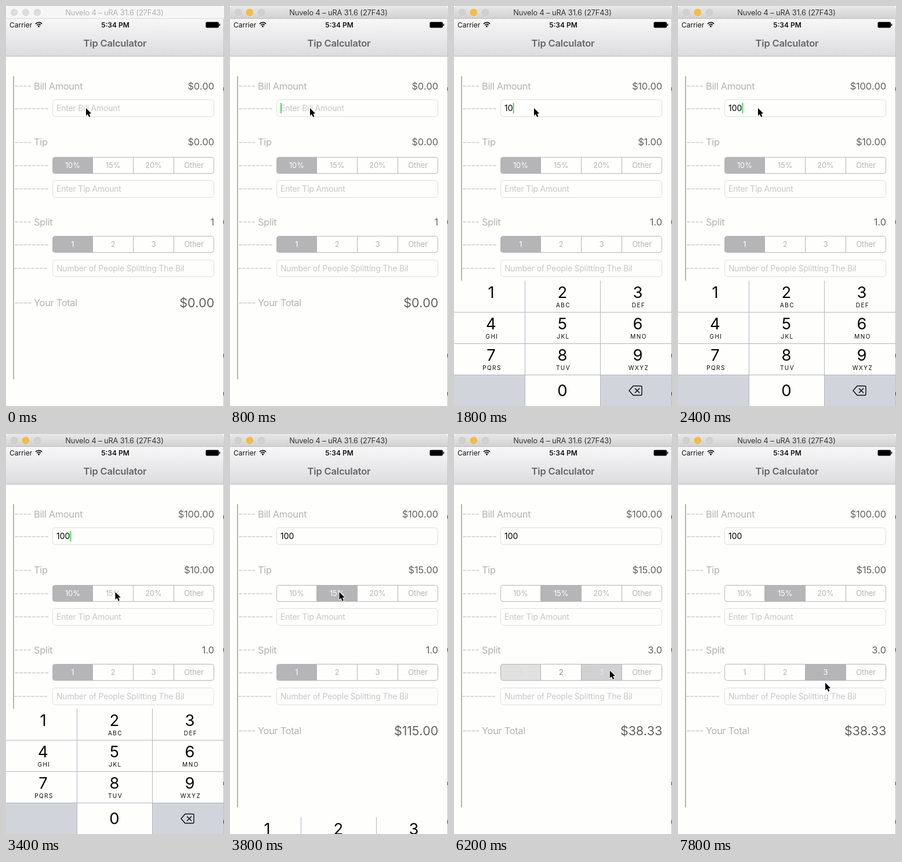
These frames come from a looping animation (376 by 689 pixels, 8000 ms). An HTML page with a canvas:

```html
<!DOCTYPE html>
<html lang="en">
<head>
<meta charset="utf-8">
<title>Tip Calculator</title>
<style>
  html, body { margin: 0; width: 100%; height: 100%; overflow: hidden; background: #fff; }
  canvas { display: block; width: 376px; height: 689px; }
</style>
</head>
<body>
<canvas id="stage"></canvas>
<script>
const W = 376, H = 689, LOOP = 8000, TICK = 200;
const GRAY = '#b5b5b8', LABEL = '#b3b3b5', VALUE = '#636363', HINT = '#c7c7cc', PAPER = '#fefefd';
const ACTIVATE = 400, FOCUS = 800, TIP_TAP = 3600, SPLIT_TAP = 6080;
const KEYS_TOP = 473, ROW = 54;

const canvas = document.getElementById('stage');
const ctx = canvas.getContext('2d');
const ratio = window.devicePixelRatio || 1;
canvas.width = W * ratio;
canvas.height = H * ratio;

const clamp = v => Math.max(0, Math.min(1, v));
const money = v => '$' + v.toFixed(2);

function text(str, x, y, size, color, { align = 'left', weight = 400, spacing = -0.2, kerning = 'auto' } = {}) {
  ctx.font = `${weight} ${size}px Inter, "Open Sans", sans-serif`;
  ctx.letterSpacing = spacing + 'px';
  ctx.fontKerning = kerning;
  ctx.textAlign = align;
  ctx.fillStyle = color;
  ctx.fillText(str, x, y);
  return ctx.measureText(str).width;
}

function rect(x, y, w, h, color) {
  ctx.fillStyle = color;
  ctx.fillRect(x, y, w, h);
}

function line(points, color, width = 1, dash = []) {
  ctx.beginPath();
  points.forEach(([x, y]) => ctx.lineTo(x, y));
  ctx.setLineDash(dash);
  ctx.strokeStyle = color;
  ctx.lineWidth = width;
  ctx.stroke();
  ctx.setLineDash([]);
}

function roundRect(x, y, w, h, r) {
  ctx.beginPath();
  ctx.roundRect(x, y, w, h, r);
}

function gradient(y0, y1, from, to) {
  const g = ctx.createLinearGradient(0, y0, 0, y1);
  g.addColorStop(0, from);
  g.addColorStop(1, to);
  return g;
}

function disc(x, y, r, color) {
  ctx.beginPath();
  ctx.arc(x, y, r, 0, 7);
  ctx.fillStyle = color;
  ctx.fill();
}

function windowBar(active) {
  roundRect(0, 0, W, 22, [5, 5, 0, 0]);
  ctx.fillStyle = active ? gradient(0, 22, '#e9e8e9', '#d2d1d2') : '#f6f6f6';
  ctx.fill();
  rect(0, 21, W, 1, active ? '#b9b9b9' : '#dadada');
  [14, 34, 54].forEach((x, i) => {
    disc(x, 11, 6, active ? (i === 1 ? '#e6ab38' : '#c4c4c4') : '#d0d0d0');
    disc(x, 11, 5.4, active ? (i === 1 ? '#fdbd36' : '#d0d0d0') : '#dddddd');
  });
  text('Nuvelo 4 – uRA 31.6 (27F43)', 187, 16, 12.8, active ? '#333' : '#b0b0b0',
    { align: 'center', spacing: -0.1 });
}

function navBar() {
  rect(0, 22, W, 64, gradient(22, 86, '#f7f7f8', '#dcdcde'));
  rect(0, 86, W, 1, '#b6b6b8');
  text('Carrier', 6, 36.5, 12, '#111', { spacing: 0 });
  ctx.lineWidth = 1.7;
  ctx.strokeStyle = '#111';
  for (const r of [4.3, 7.6]) {
    ctx.beginPath();
    ctx.arc(56.5, 36, r, -Math.PI * 0.76, -Math.PI * 0.24);
    ctx.stroke();
  }
  disc(56.5, 35, 1.5, '#111');
  text('5:34 PM', 188.5, 36.5, 12, '#111', { align: 'center', weight: 600, spacing: 0 });
  roundRect(344.5, 27.5, 22.5, 10, 2);
  ctx.fillStyle = '#000';
  ctx.fill();
  rect(367.6, 30.6, 1.6, 3.8, '#000');
  text('Tip Calculator', 188, 70, 16.5, '#666667', { align: 'center', weight: 600, spacing: -0.18 });
}

function tree() {
  rect(12, 121, 2, 522, GRAY);
  const branch = (x, y, n) => line([[x, y], [x + n * 7.4 - 1.6, y]], GRAY, 1.2, [5.7, 1.7]);
  for (const y of [138, 235, 372, 511.5]) branch(15.5, y, 4);
  for (const y of [177, 275, 315, 411.5]) branch(15.5, y, 8);
  branch(13.5, 452, 8);
}

function row(label, value, y, size = 16.5, drop = 0) {
  text(label, 48, y, 16.5, LABEL, { spacing: -0.35 });
  text(value, 359, y + drop, size, VALUE, { align: 'right', kerning: 'none' });
}

function field(y, hint, typed = '', caret = false) {
  roundRect(80.5, y + 0.5, 278, 29, 5);
  ctx.strokeStyle = '#dedee0';
  ctx.lineWidth = 1;
  ctx.stroke();
  if (!typed) text(hint, 87, y + 20, 14, HINT);
  const typedWidth = text(typed, 87, y + 20, 14, '#000', { spacing: 0, kerning: 'none' });
  if (caret) rect(87 + typedWidth, y + 6, 2, 18, '#4cd964');
}

// Cross-fades the highlight from one cell to another.
function segments(y, names, from, to, p) {
  const cell = 69.75, x0 = 80.5;
  const shape = () => roundRect(x0, y + 0.5, 278, 28, 4);
  ctx.save();
  shape();
  ctx.clip();
  names.forEach((name, i) => {
    const on = i === from ? 1 - p : i === to ? p : 0;
    const fading = p > 0 && p < 1 && i > from && i < to;
    const x = x0 - 0.5 + i * cell;
    const label = color => text(name, x + cell / 2, y + 19, 13, color, { align: 'center', spacing: -0.1 });
    ctx.globalAlpha = on;
    rect(Math.floor(x), y, 70, 29, GRAY);
    ctx.globalAlpha = 1 - on;
    label(fading ? '#8e8e90' : GRAY);
    ctx.globalAlpha = on;
    label('#fff');
    ctx.globalAlpha = 1;
    if (i) rect(Math.floor(x), y, 1, 29, GRAY);
  });
  ctx.restore();
  shape();
  ctx.strokeStyle = GRAY;
  ctx.lineWidth = 1;
  ctx.stroke();
}

function keypad(top) {
  if (top > H - 1) return;
  const centers = [64, 187, 317], edge = '#b4b6bb', ink = '#0a0a0a';
  const letters = ['', 'ABC', 'DEF', 'GHI', 'JKL', 'MNO', 'PQRS', 'TUV', 'WXYZ'];
  const last = top + 3 * ROW;
  rect(0, top, W, H, PAPER);
  rect(0, last, 122, ROW + 6, '#d1d4db');
  rect(252, last, W, ROW + 6, '#d1d4db');
  for (let r = 1; r < 4; r++) rect(0, top + r * ROW, W, 1, edge);
  for (const x of [122, 252]) rect(x, top, 1, H, edge);
  letters.forEach((group, i) => {
    const x = centers[i % 3], y = top + Math.floor(i / 3) * ROW;
    text(i + 1, x, y + 30, 27.5, ink, { align: 'center', spacing: 0 });
    text(group, x + 1.5, y + 45.5, 10, ink, { align: 'center', spacing: 1.4 });
  });
  text('0', 187, last + 37, 27.5, ink, { align: 'center', spacing: 0 });

  const x = 313, y = last + 27.5;
  ctx.lineJoin = 'round';
  ctx.beginPath();
  ctx.moveTo(x - 11, y);
  ctx.lineTo(x - 4, y - 8);
  ctx.arcTo(x + 11, y - 8, x + 11, y, 2);
  ctx.arcTo(x + 11, y + 8, x, y + 8, 2);
  ctx.lineTo(x - 4, y + 8);
  ctx.closePath();
  ctx.strokeStyle = ink;
  ctx.lineWidth = 1.4;
  ctx.stroke();
  for (const s of [-1, 1]) line([[x - 1, y - 4 * s], [x + 7, y + 4 * s]], ink, 1.4);
}

// Pointer stops: time, x, y.
const path = [
  [0, 138, 176], [2600, 138, 176], [3400, 188.5, 272.3], [4200, 188.5, 272.3], [5000, 176, 406.5],
  [5800, 268.8, 407.5], [7200, 268.8, 407.5], [7400, 256, 426], [7600, 256, 426], [7800, 254, 428.5],
  [LOOP, 254, 428.5]
];

function pointer(t) {
  const i = path.findIndex(stop => stop[0] > t);
  const [t0, x0, y0] = path[i - 1], [t1, x1, y1] = path[i];
  const p = (t - t0) / (t1 - t0);
  ctx.save();
  ctx.translate(x0 + (x1 - x0) * p, y0 + (y1 - y0) * p);
  ctx.scale(0.93, 0.93);
  ctx.beginPath();
  [[0, 0], [0, 14], [3.2, 11], [5.6, 16.5], [8, 15.4], [5.7, 10.2], [10, 10]]
    .forEach(([x, y]) => ctx.lineTo(x, y));
  ctx.closePath();
  ctx.lineJoin = 'round';
  ctx.strokeStyle = '#fff';
  ctx.lineWidth = 2;
  ctx.stroke();
  ctx.fillStyle = '#000';
  ctx.fill();
  ctx.restore();
}

function keypadTop(t) {
  const travel = H - KEYS_TOP;
  const decay = start => travel * Math.exp(-(t - start) / 100);
  if (t <= FOCUS) return H;
  return Math.round(t <= TIP_TAP ? KEYS_TOP + decay(FOCUS) : H - decay(TIP_TAP));
}

function draw(t) {
  const typed = '100'.slice(0, [1600, 1800, 2200].filter(k => t >= k).length);
  const bill = Number(typed);
  const tip = bill * (t > TIP_TAP ? 0.15 : 0.1);
  const people = t > SPLIT_TAP ? 3 : 1;
  const blink = t < 2400 || (t - 2400) % 1000 < 600;
  const caret = t >= FOCUS && t <= TIP_TAP && blink;

  ctx.setTransform(ratio, 0, 0, ratio, 0, 0);
  rect(0, 0, W, H, '#fff');
  rect(0, 22, W, H, PAPER);
  windowBar(t >= ACTIVATE);
  navBar();
  tree();

  row('Bill Amount', money(bill), 144);
  field(161, 'Enter Bill Amount', typed, caret);
  row('Tip', money(tip), 240);
  segments(260, ['10%', '15%', '20%', 'Other'], 0, 1, clamp((t - TIP_TAP) / 200));
  field(300, 'Enter Tip Amount');
  row('Split', typed ? people.toFixed(1) : '1', 378);
  segments(396, ['1', '2', '3', 'Other'], 0, 2, clamp((t - SPLIT_TAP) / 200));
  field(437, 'Number of People Splitting The Bil');
  row('Your Total', money((bill + tip) / people), 517, 21.5, 2);
  keypad(keypadTop(t));

  rect(375, 22, 1, H, '#c0c0c0');
  for (const y of [140, 369, 599, 665]) rect(375, y, 1, 6, '#333');
  pointer(t);
}

function frame(now) {
  draw(Math.floor((now % LOOP) / TICK) * TICK);
  requestAnimationFrame(frame);
}
requestAnimationFrame(frame);
</script>
</body>
</html>
```
